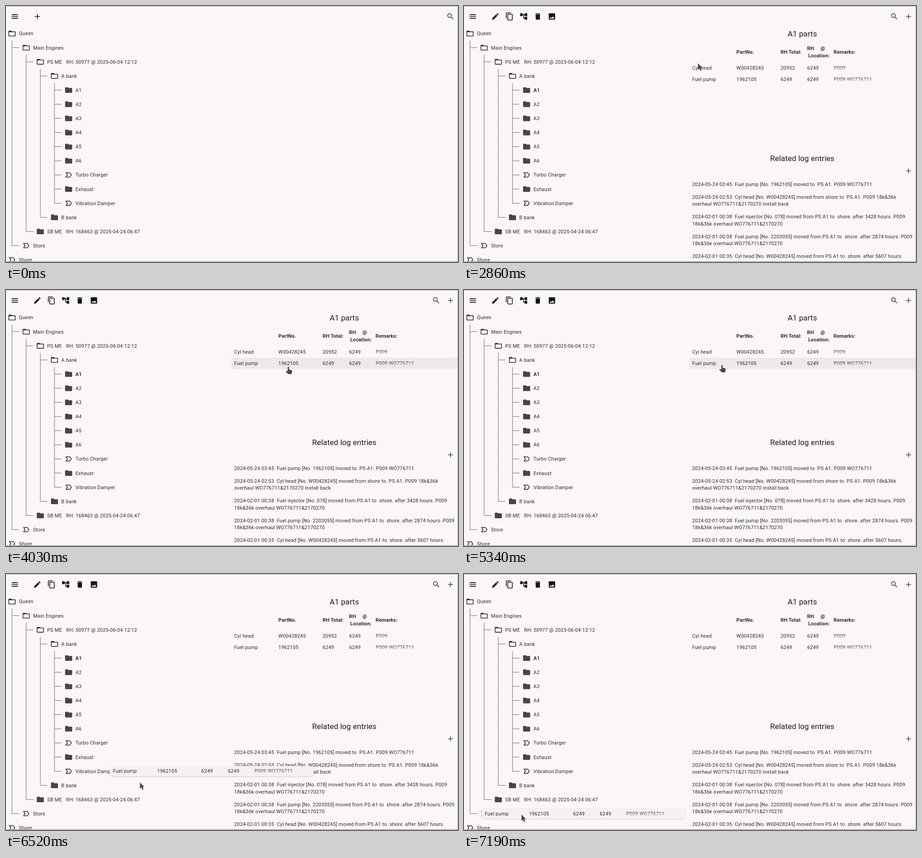
Recreate the animation shown at these times as an HTML page. Size 994 by 563 pixels, loop 8000 ms.

```html
<!DOCTYPE html>
<html lang="en">
<head>
<meta charset="utf-8">
<title>Parts tree</title>
<style>
  html, body { margin: 0; width: 100%; height: 100%; overflow: hidden; background: #fbf6f7; }
  svg { display: block; width: 994px; height: 563px; }
  text { font: 10.9px Roboto, sans-serif; letter-spacing: .195px; fill: #2d2b2e; white-space: pre; }
  .bold { font-weight: 700; }
  .title { font-size: 17.12px; letter-spacing: 0; text-anchor: middle; fill: #1d1b20; }
  .fade { fill: url(#fade); }
  .line { fill: none; stroke: #9a9391; stroke-width: 1.5; }
  .pointer { fill: #4a464a; }
</style>
</head>
<body>
<svg viewBox="0 0 994 563">
  <defs>
    <linearGradient id="fade" x1="0" y1="0" x2="0" y2="1">
      <stop offset=".3" stop-color="#3a373a"/>
      <stop offset=".88" stop-color="#3a373a" stop-opacity=".2"/>
    </linearGradient>
    <filter id="shadow" x="-5%" y="-40%" width="110%" height="200%">
      <feDropShadow dx="0" dy=".8" stdDeviation=".8" flood-opacity=".22"/>
    </filter>
  </defs>
  <g id="tree"></g>
  <g id="idle"></g>
  <g id="panel"></g>
  <path fill="#c6c3c2" d="M0 0h994v1.5H0z"/>
  <path fill="#a8a4a0" d="M0 561.5h994V563H0zM993 0h1v563h-1z"/>
  <g id="ghost"><rect y=".6" width="448" height="22.400" rx="6" fill="#f5f0f1" filter="url(#shadow)"/></g>
  <path id="arrow" class="pointer" d="M0 0V14.2L3.2 11.5 5.6 16.8 8 15.7 5.7 10.5 9.8 10.2Z"/>
  <path id="hand" class="pointer" d="M-1.4 0Q.3-1.2 1.4.7V6L6.300 6.900Q8.300 7.300 8.200 9.200L7.400 14.400Q7.100 16 5.600 16H.6Q-.5 16-1.200 15.200L-6 10Q-5.200 8.400-3.500 9.100L-1.600 10Z"/>
</svg>
<script>
const LOOP = 8000, SCALE = .778, STEP = 31.1;
const DARK = '#141216', GREY = '#47434a';
const ICONS = {
  menu: 'M3 18h18v-2H3zm0-5h18v-2H3zm0-7v2h18V6z',
  add: 'M19 13h-6v6h-2v-6H5v-2h6V5h2v6h6z',
  search: 'M15.5 14h-.79l-.28-.27C15.41 12.59 16 11.11 16 9.5 16 5.91 13.09 3 9.5 3S3 5.91 3 9.5 5.91 16 9.5 16c1.61 0 3.09-.59 4.23-1.57l.27.28v.79l5 4.99L20.49 19zm-6 0C7.01 14 5 11.99 5 9.5S7.01 5 9.5 5 14 7.01 14 9.5 11.99 14 9.5 14z',
  edit: 'M3 17.25V21h3.75L17.81 9.94l-3.75-3.75zM20.71 7.04c.39-.39.39-1.02 0-1.41l-2.34-2.34c-.39-.39-1.02-.39-1.41 0l-1.83 1.83 3.75 3.75z',
  copy: 'M16 1H4c-1.1 0-2 .9-2 2v14h2V3h12zm3 4H8c-1.1 0-2 .9-2 2v14c0 1.1.9 2 2 2h11c1.1 0 2-.9 2-2V7c0-1.1-.9-2-2-2zm0 16H8V7h11z',
  branch: 'M22 11V3h-7v3H9V3H2v8h7V8h2v10h4v3h7v-8h-7v3h-2V8h2v3z',
  bin: 'M6 19c0 1.1.9 2 2 2h8c1.1 0 2-.9 2-2V7H6zM19 4h-3.5l-1-1h-5l-1 1H5v2h14z',
  image: 'M21 19V5c0-1.1-.9-2-2-2H5c-1.1 0-2 .9-2 2v14c0 1.1.9 2 2 2h14c1.1 0 2-.9 2-2zM8.5 13.5l2.5 3.01L14.5 12l4.5 6H5z',
  closed: 'M10 4H4c-1.1 0-2 .9-2 2v12c0 1.1.9 2 2 2h16c1.1 0 2-.9 2-2V8c0-1.1-.9-2-2-2h-8z',
  open: 'M20 6h-8l-2-2H4c-1.1 0-2 .9-2 2v12c0 1.1.9 2 2 2h16c1.1 0 2-.9 2-2V8c0-1.1-.9-2-2-2zm0 12H4V8h16z',
  label: 'M15 19H3l4.5-7L3 5h12c.65 0 1.26.31 1.63.84L21 12l-4.37 6.16c-.37.52-.98.84-1.63.84zm-8.5-2H15l3.5-5L15 7H6.5l3.5 5z'
};

const $ = id => document.getElementById(id);
function add(parent, tag, attrs, content = '') {
  const el = document.createElementNS('http://www.w3.org/2000/svg', tag);
  for (const key in attrs) el.setAttribute(key, attrs[key]);
  el.textContent = content;
  return parent.appendChild(el);
}
const moveTo = (el, x, y) => el.setAttribute('transform', `translate(${x} ${y})`);
const show = (el, visible) => { el.style.display = visible ? '' : 'none'; };
// Text and icons are placed by their vertical centre.
const text = (parent, x, y, content, cls = '') => add(parent, 'text', { x, y: y + 3.9, class: cls }, content);
const icon = (parent, name, x, y, fill = DARK) => add(parent, 'path', {
  d: ICONS[name], fill, transform: `translate(${x} ${y}) scale(${SCALE}) translate(-12 -12)`
});

// Tree: depth, icon, label, running hours
const nodes = [
  [0, 'open', 'Queen'], [1, 'open', 'Main Engines'],
  [2, 'open', 'PS ME', 'RH: 50977 @ 2025-06-04 12:12'], [3, 'open', 'A bank'],
  ...[1, 2, 3, 4, 5, 6].map(n => [4, 'closed', 'A' + n]),
  [4, 'label', 'Turbo Charger'], [4, 'closed', 'Exhaust'], [4, 'label', 'Vibration Damper'],
  [3, 'closed', 'B bank'], [2, 'closed', 'SB ME', 'RH: 168463 @ 2025-04-24 06:47'],
  [1, 'label', 'Store'], [0, 'label', 'Shore']
];
const tree = $('tree'), parentY = [];
let selected, branches = '';
nodes.forEach(([depth, kind, name, hours], i) => {
  const x = 13.3 + depth * STEP, y = 60.5 + i * STEP;
  parentY[depth] = y;
  if (depth) branches += `M${x - STEP} ${parentY[depth - 1] + 15.6}V${y}h15.6`;
  icon(tree, kind, x, y, kind === 'closed' ? GREY : '#2b292e');
  const label = text(tree, x + 15, y, name);
  if (name === 'A1') selected = label;
  if (hours) text(tree, 132.3, y, hours);
});
// One path, so that shared trunks are painted only once.
add(tree, 'path', { class: 'line', d: branches });
icon(tree, 'menu', 19.5, 23);

const idle = $('idle'), panel = $('panel');
icon(idle, 'add', 69, 23);
icon(idle, 'search', 977.5, 23, GREY);

['edit', 'copy', 'branch', 'bin', 'image'].forEach((name, i) => icon(panel, name, 69 + i * STEP, 23));
icon(panel, 'search', 946.3, 23, GREY);
icon(panel, 'add', 977.5, 23, GREY);
icon(panel, 'add', 977.5, 362.5, GREY);
add(panel, 'text', { x: 744, y: 67.4, class: 'title' }, 'A1 parts');
add(panel, 'text', { x: 744, y: 341, class: 'title' }, 'Related log entries');

text(panel, 599, 101, 'PartNo.', 'bold');
text(panel, 696.3, 101, 'RH Total:', 'bold');
text(panel, 754.6, 93.5, 'RH', 'bold');
text(panel, 784, 93.5, '@', 'bold');
text(panel, 757, 109, 'Location:', 'bold');
text(panel, 812.8, 101, 'Remarks:', 'bold');

const columns = [6.5, 103.8, 201, 259.5, 317.8];
const fuelPump = ['Fuel pump', '1962105', '6249', '6249', 'P009 WO776711'];
const cells = (parent, y, values) =>
  values.forEach((value, i) => text(parent, columns[i], y, value, i === 4 ? 'fade' : ''));
function tableRow(y, values) {
  const row = add(panel, 'g', { transform: `translate(495.300 ${y})` });
  const hover = add(row, 'rect', { y: -12.5, width: 497.7, height: 25 });
  cells(row, 0, values);
  return hover;
}
const headHover = tableRow(136.5, ['Cyl head', 'W00428245', '20952', '6249', 'P009']);
const pumpHover = tableRow(161.5, fuelPump);
cells($('ghost'), 11.5, fuelPump);

const log = [
  ['2024-05-24 03:45  Fuel pump [No. 1962105] moved to  PS A1. P009 WO776711'],
  ['2024-05-24 02:53  Cyl head [No. W00428245] moved from shore to  PS A1. P009 18k&36k', 'overhaul WO776711&2170270 install back'],
  ['2024-02-01 00:38  Fuel injector [No. 078] moved from PS A1 to  shore. after 3428 hours. P009', '18k&36k overhaul WO776711&2170270'],
  ['2024-02-01 00:38  Fuel pump [No. 2203055] moved from PS A1 to  shore. after 2874 hours. P009', '18k&36k overhaul WO776711&2170270'],
  ['2024-02-01 00:35  Cyl head [No. W00428245] moved from PS A1 to  shore. after 5607 hours.']
];
let logY = 392;
for (const entry of log) {
  entry.forEach((line, i) => text(panel, 501.8, logY + i * 15.56, line));
  logY += entry.length * 15.56 + 12.4;
}

// Pointer and dragged-row paths: time, x, y
const pointerPath = [
  [270, 353, 488], [570, 250, 266], [970, 250, 266], [1240, 172, 200], [1650, 156, 181],
  [2390, 156, 181], [2860, 514, 126], [3190, 604, 147], [3600, 618, 163], [4030, 621, 169],
  [4770, 621, 169], [4970, 548, 168], [5210, 548, 168], [5450, 582, 163],
  [6020, 582, 163], [6180, 496, 253], [6520, 295, 458], [6820, 187, 520], [7190, 126.5, 529]
];
const ghostPath = [[6020, 495, 150], [6180, 441.7, 202.5], [6520, 229, 421.5], [6820, 111, 501], [7190, 39, 515.5]];

// Monotone cubic interpolation; pauses stay flat.
function at(path, t) {
  const last = path.length - 1;
  if (t <= path[0][0]) return path[0].slice(1);
  if (t >= path[last][0]) return path[last].slice(1);
  const i = path.findIndex(p => p[0] > t) - 1;
  const span = path[i + 1][0] - path[i][0], u = (t - path[i][0]) / span;
  return [1, 2].map(axis => {
    const rate = k => (path[k + 1][axis] - path[k][axis]) / (path[k + 1][0] - path[k][0]);
    const slope = k => {
      if (k === 0 || k === last) return 0;
      const a = rate(k - 1), b = rate(k);
      return a * b <= 0 ? 0 : 2 * a * b / (a + b);
    };
    const from = path[i][axis], to = path[i + 1][axis];
    return from + (to - from) * u * u * (3 - 2 * u)
      + span * u * (1 - u) * (slope(i) * (1 - u) - slope(i + 1) * u);
  });
}
const ramp = (t, start, length) => Math.min(1, Math.max(0, (t - start) / length));
const hoverAt = (t, on, off) => .055 * (ramp(t, on, 80) - ramp(t, off, 200));

function draw() {
  const t = performance.now() % LOOP;
  const opened = t >= 2050, dragging = t >= 6020;
  show(idle, !opened);
  show(panel, opened);
  selected.setAttribute('class', opened ? 'bold' : '');
  headHover.setAttribute('opacity', hoverAt(t, 2880, 3250));
  pumpHover.setAttribute('opacity', hoverAt(t, 3250, 6140));

  show($('ghost'), dragging);
  moveTo($('ghost'), ...at(ghostPath, t));

  const pointing = t > 1450 && t < 2420 || t > 2890 && !dragging;
  show($('arrow'), t >= 270 && !pointing);
  show($('hand'), pointing);
  moveTo($(pointing ? 'hand' : 'arrow'), ...at(pointerPath, t));
  requestAnimationFrame(draw);
}
draw();
</script>
</body>
</html>
```
